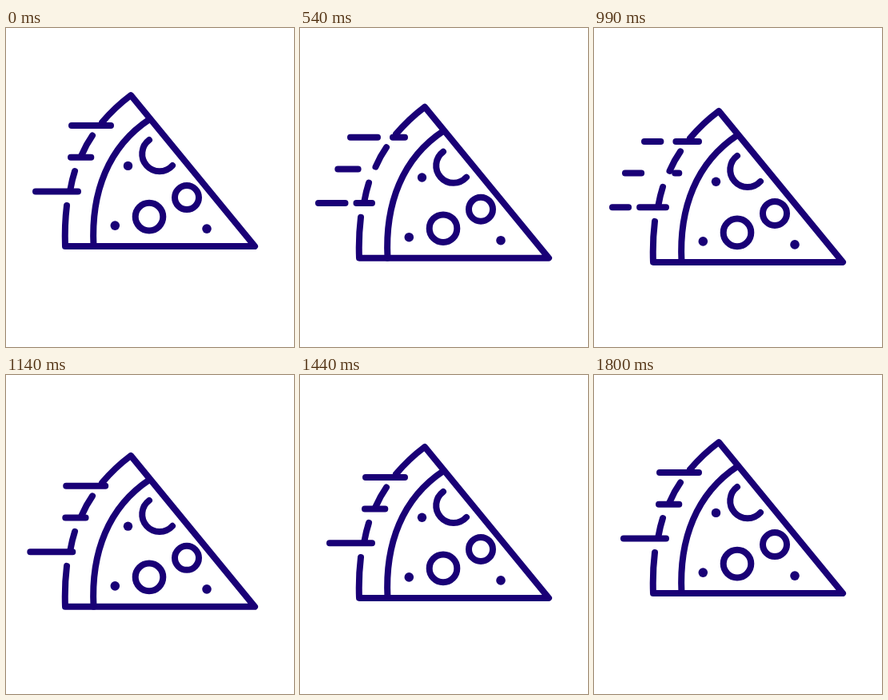
Recreate the animation shown at these times as an HTML page. Size 360 px wide and 399 px high, loop 1830 ms.

```html
<!DOCTYPE html>
<html lang="en">
<head>
<meta charset="utf-8">
<title>Speeding pizza slice</title>
<style>
  html, body { margin: 0; width: 100%; height: 100%; overflow: hidden; background: #fff; }
  svg { display: block; width: 100%; height: 100%; }
  .ink { fill: none; stroke: #190076; stroke-width: 8; stroke-linecap: round; stroke-linejoin: round; }
  .dot { fill: #190076; stroke: none; }
</style>
</head>
<body>
<svg viewBox="0 0 360 399">
  <g id="slice" class="ink">
    <!-- crust and edges -->
    <path d="M120 118Q136 99 156 84L311 273H74Q73 247 76 222"/>
    <path d="M80.500 201.500Q82.500 190 86 179M94.500 159Q100 146 108 134.500"/>
    <path d="M179.500 114C128 148 106 205 109.500 273"/>
    <!-- toppings -->
    <path d="M179 140A21.700 21.700 0 1 0 208 172"/>
    <circle cx="179" cy="236" r="17.300"/>
    <circle cx="226" cy="212" r="15"/>
    <g class="dot">
      <circle cx="152.500" cy="172.300" r="5.700"/>
      <circle cx="136.300" cy="247" r="5.800"/>
      <circle cx="251" cy="251" r="5.800"/>
    </g>
    <path id="wind"/>
  </g>
</svg>
<script>
const LOOP = 1830, TICK = 30, POSES = 50;
const slice = document.getElementById('slice');
const wind = document.getElementById('wind');

// Each track: y, left end, right end, dash length
const tracks = [
  [122, 63, 131, 49],
  [161.7, 39, 106.3, 25.3],
  [204.3, 23, 90, 53]
];

// Part of a dash ending at `end` that lies inside its track
function dash(y, left, right, length, end) {
  const a = Math.max(left, end - length), b = Math.min(right, end);
  return b - a > 0.1 ? `M${a} ${y}H${b}` : '';
}

function draw(ms) {
  const pose = Math.floor(Math.floor(ms % LOOP / TICK) * 5 / 6);
  const bob = 10.3 * (1 - Math.cos((pose + 1) / POSES * 2 * Math.PI));
  slice.setAttribute('transform', `translate(0 ${bob})`);

  const phase = pose % 10 / 10;
  wind.setAttribute('d', tracks.map(([y, left, right, length]) => {
    const span = right - left, end = right - phase * span;
    return dash(y, left, right, length, end) + dash(y, left, right, length, end + span);
  }).join(''));
}

const start = performance.now();
function loop() {
  draw(performance.now() - start);
  requestAnimationFrame(loop);
}
loop();
</script>
</body>
</html>
```
